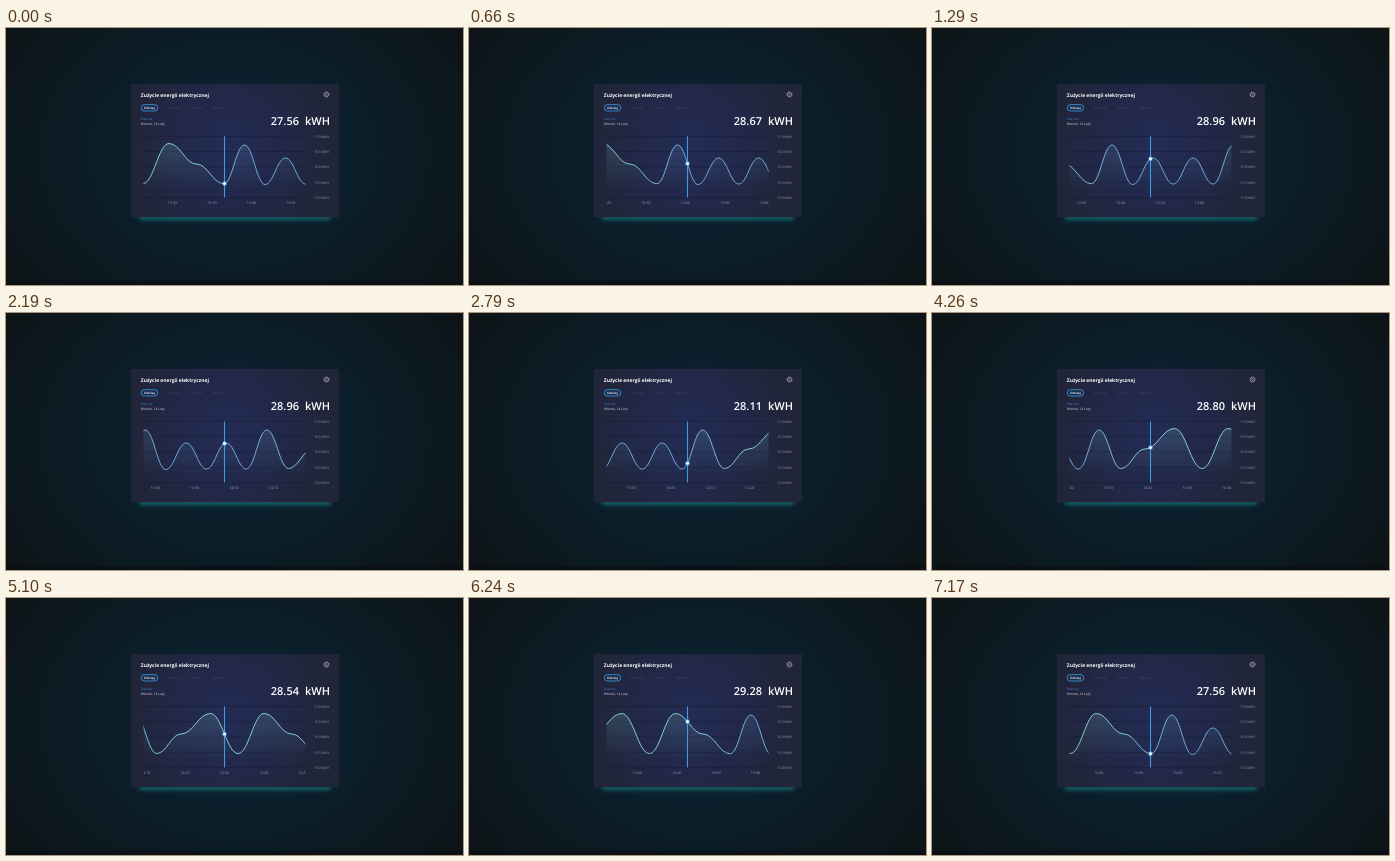
These frames come from a looping animation (457 by 257 pixels, 7.2 s). An HTML page:

```html
<!DOCTYPE html>
<html lang="pl">
<head>
<meta charset="utf-8">
<title>Zużycie energii</title>
<style>
html, body { margin: 0; width: 100%; height: 100%; overflow: hidden; background: #0c171d; }
svg { display: block; width: 457px; height: 257px; }
text { font-family: "Open Sans", "Noto Sans", sans-serif; font-size: 3.4px; text-rendering: geometricPrecision; white-space: pre; }
.mid { text-anchor: middle; }
.dim { fill: #42475f; }
.axis { fill: #989caf; }
.big { font-size: 11px; font-weight: 600; fill: #fff; }
</style>
</head>
<body>
<svg viewBox="0 0 457 257">
  <defs>
    <radialGradient id="bg" gradientUnits="userSpaceOnUse" cx="228" cy="125" r="260" gradientTransform="translate(0 25) scale(1 .8)">
      <stop stop-color="#0b2634"/><stop offset=".5" stop-color="#0b1e29"/><stop offset="1" stop-color="#0d1519"/>
    </radialGradient>
    <radialGradient id="card" gradientUnits="userSpaceOnUse" cx="222" cy="122" r="105">
      <stop stop-color="#232c55"/><stop offset=".5" stop-color="#22284a"/><stop offset="1" stop-color="#212538"/>
    </radialGradient>
    <linearGradient id="hue" gradientUnits="userSpaceOnUse" x1="137" x2="463.2" y1="0" y2="0" spreadMethod="repeat">
      <stop stop-color="#86cdcb"/><stop offset=".15" stop-color="#84cbcc"/>
      <stop offset=".33" stop-color="#6fa8d8"/><stop offset=".62" stop-color="#6fa8d8"/>
      <stop offset=".82" stop-color="#86cdcb"/><stop offset="1" stop-color="#86cdcb"/>
    </linearGradient>
    <linearGradient id="fade" x1="0" x2="0" y1="0" y2="1">
      <stop stop-color="#fff" stop-opacity=".2"/><stop offset="1" stop-color="#fff" stop-opacity="0"/>
    </linearGradient>
    <mask id="down" maskUnits="userSpaceOnUse" x="137" y="112" width="163" height="50">
      <rect x="137" y="112" width="163" height="50" fill="url(#fade)"/>
    </mask>
    <clipPath id="plot"><rect x="137.5" y="104" width="162" height="75"/></clipPath>
    <filter id="blur" x="-20%" y="-300%" width="140%" height="700%"><feGaussianBlur stdDeviation="2"/></filter>
  </defs>

  <rect width="457" height="257" fill="url(#bg)"/>
  <rect y="252.5" width="457" height="4.5" fill="#0a0f14" opacity=".7"/>
  <rect x="133" y="185" width="192" height="7" rx="2" fill="#12666a" filter="url(#blur)"/>
  <rect x="125" y="56" width="208" height="133.3" rx="1" fill="url(#card)"/>

  <text x="134.8" y="69.2" fill="#fff" style="font-size:4.95px;font-weight:700">Zużycie energii elektrycznej</text>
  <g fill="none" stroke="#a9adba">
    <circle cx="320.5" cy="66.5" r="2.2" stroke-width=".7"/>
    <circle cx="320.5" cy="66.5" r="2.6" stroke-width=".6" stroke-dasharray="1 1.04"/>
    <circle cx="320.5" cy="66.5" r=".8" stroke-width=".5"/>
  </g>

  <rect x="135.2" y="76.6" width="16.6" height="6.4" rx="3.2" fill="#1c2b49" stroke="#3c9be6" stroke-width=".8"/>
  <text class="mid" x="143.5" y="81" fill="#d6e9fb" style="font-size:3.2px;font-weight:700">Dzisiaj</text>
  <text class="mid dim" x="168" y="81">Wczoraj</text>
  <text class="mid dim" x="191" y="81">Tydzień</text>
  <text class="mid dim" x="213" y="81">Miesiąc</text>

  <text x="134.8" y="92.3" fill="#3f8fd8" style="font-size:3.2px">Stan na:</text>
  <text x="134.8" y="97.2" fill="#d9dce6" style="font-size:3.3px">Wtorek, 14 Luty</text>
  <text class="big" id="value" x="264.8" y="97.1"></text>
  <text class="big" x="324" y="97.1" text-anchor="end">kWH</text>

  <g id="scale"></g>
  <g clip-path="url(#plot)">
    <g mask="url(#down)"><path id="area" fill="url(#hue)"/></g>
    <path id="line" fill="none" stroke="url(#hue)" stroke-width="1"/>
    <g id="hours"></g>
  </g>
  <path d="M218.5 108.3V169.5" stroke="#3e9aea" stroke-width="1.1"/>
  <circle id="halo" cx="218.5" r="2.5" fill="#4aa5f2" opacity=".55"/>
  <circle id="dot" cx="218.5" r="1.6" fill="#eef7ff"/>
</svg>
<script>
const LOOP = 7200, STEP = 30, PERIOD = 326.2, CURSOR = 218.5, HOUR_GAP = 39.43, HANDLE = .41;
const $ = id => document.getElementById(id);

// Crests, troughs and shoulders of one period
const crests = [[137, 155.5], [163, 115.5], [190.5, 136], [217.8, 155.7], [238.5, 117], [259, 156.5],
  [279.5, 130], [299.7, 156], [319.5, 130], [339.5, 156], [360, 117], [381.8, 155.5], [406, 136], [435.5, 115.5]];
const knots = [0, 1, 2].flatMap(n => crests.map(([x, y]) => [x + n * PERIOD, y]));

// Time in ms and the reading shown then
const readings = [[0, 27.56], [450, 29.7], [900, 27.5], [1290, 28.96], [1370, 29.02], [1800, 27.53],
  [2190, 28.96], [2240, 29.02], [2670, 27.53], [3120, 29.7], [3420, 28.35], [3600, 27.56], [4150, 28.6],
  [4790, 29.75], [5100, 28.54], [5385, 27.56], [5980, 29.75], [6240, 29.28], [6600, 28.6], [7170, 27.56], [7200, 27.56]];

const segment = (list, x) => {
  const i = list.findIndex(p => p[0] > x);
  return i < 1 ? [list.at(-1), list.at(-1), 0]
    : [list[i - 1], list[i], (x - list[i - 1][0]) / (list[i][0] - list[i - 1][0])];
};

function curveY(x) {
  const [a, b, k] = segment(knots, x);
  let lo = 0, hi = 1, s;
  for (let i = 0; i < 20; i++) {
    s = (lo + hi) / 2;
    const r = 1 - s;
    if (3 * r * r * s * HANDLE + 3 * r * s * s * (1 - HANDLE) + s ** 3 < k) lo = s; else hi = s;
  }
  return a[1] + (b[1] - a[1]) * s * s * (3 - 2 * s);
}

function reading(t) {
  const [a, b, k] = segment(readings, t);
  return a[1] + (b[1] - a[1]) * k;
}

const path = 'M' + knots[0] + knots.slice(1).map(([x, y], i) => {
  const [px, py] = knots[i], h = (x - px) * HANDLE;
  return `C${px + h} ${py} ${x - h} ${y} ${x} ${y}`;
}).join('');
$('line').setAttribute('d', path);
$('area').setAttribute('d', `${path}V170H137Z`);

$('scale').innerHTML = [0, 1, 2, 3, 4].map(i => {
  const y = 108.3 + i * 15.35;
  return `<path d="M137.5 ${y}H300" stroke="#161b31" stroke-width=".7" opacity=".75"/>
    <text class="axis" x="323" y="${y + 1.2}" text-anchor="end">${(17 - i / 2).toFixed(1)} kWH</text>`;
}).join('');

$('hours').innerHTML = Array.from({ length: 14 }, (_, i) => {
  const min = 790 + i * 10;
  const label = `${Math.floor(min / 60)}:${String(min % 60).padStart(2, '0')}`;
  return `<text class="mid axis" style="font-size:3.65px" x="${166.5 + (i - 1) * HOUR_GAP}" y="176.4">${label}</text>`;
}).join('');

const slide = (id, dx) => $(id).setAttribute('transform', `translate(${-dx} 0)`);

function draw(now) {
  const t = Math.floor(now % LOOP / STEP) * STEP;
  const shift = PERIOD * t / LOOP;
  slide('line', shift);
  slide('area', shift);
  slide('hours', .04396 * t);
  const y = curveY(CURSOR + shift);
  $('dot').setAttribute('cy', y);
  $('halo').setAttribute('cy', y);
  $('value').textContent = reading(t).toFixed(2);
}

const start = performance.now();
function tick() {
  draw(performance.now() - start);
  requestAnimationFrame(tick);
}
tick();
</script>
</body>
</html>
```
